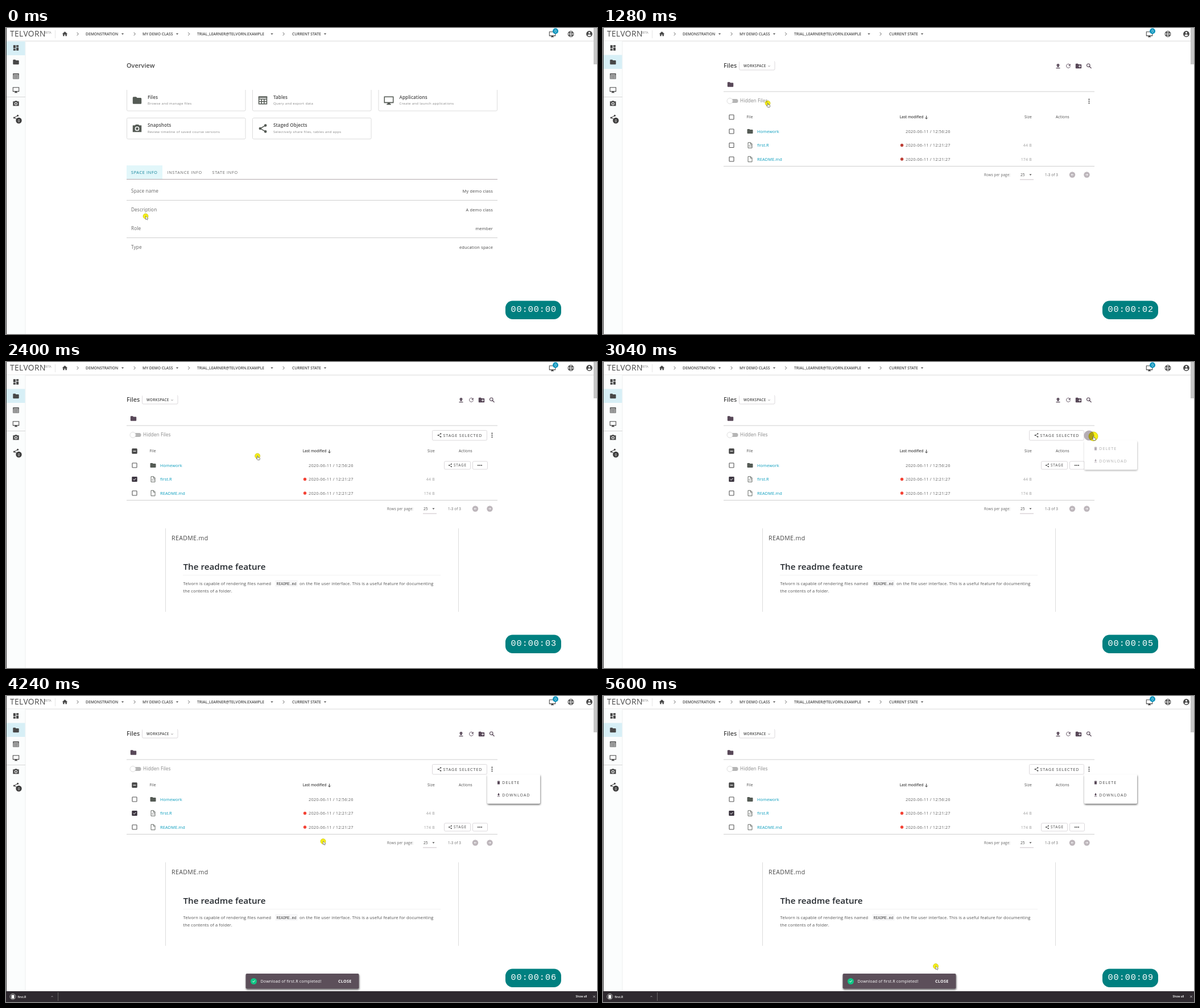
Animation of 1039 by 539 pixels, one loop 5.68 s. Source, as an HTML page:

```html
<!DOCTYPE html>
<html lang="en">
<head>
<meta charset="utf-8">
<title>File download walkthrough</title>
<style>
html, body { margin: 0; width: 100%; height: 100%; overflow: hidden; background: #fff; }
svg { display: block; width: 100%; height: 100%; }
text { font-family: "Open Sans", "Noto Sans", sans-serif; white-space: pre; }
text.mono { font-family: "Liberation Mono", "DejaVu Sans Mono", monospace; }
#dot { mix-blend-mode: multiply; }
</style>
</head>
<body>
<svg id="stage" viewBox="0 0 1039 539" xmlns="http://www.w3.org/2000/svg"></svg>
<script>
const LOOP = 5680, STEP = 80;
const INK = '#474747', SOFT = '#858585', LINK = '#0a9dbd', PLUM = '#584858', ICON = '#555b55';

const line = (d, w = 2) =>
  `<path d="${d}" fill="none" stroke="currentColor" stroke-width="${w}"/>`;
const solid = d => `<path d="${d}" fill-rule="evenodd"/>`;
const folder = 'M10 4H4a2 2 0 0 0-2 2v12a2 2 0 0 0 2 2h16a2 2 0 0 0 2-2V8a2 2 0 0 0-2-2h-8z';
const page = line('M5 2.5h9l5 5V21.5H5zM13.5 3v5.5h5.5', 1.8);

// Icons on a 24 unit grid
const ICONS = {
  dash: solid('M3 3h8v10H3zM13 3h8v6h-8zM3 15h8v6H3zM13 11h8v10h-8z'),
  folder: solid(folder),
  newFolder: solid(folder + 'M15 9h2v3h3v2h-3v3h-2v-3h-3v-2h3z'),
  table: line('M3 4h18v16H3zM3 9h18M3 14.5h18M9 9v11M15 9v11') + solid('M2 3h20v3H2z'),
  monitor: solid('M1 3h22v15h-8v2h2v2H7v-2h2v-2H1zM3 5v11h18V5z'),
  camera: solid('M9 3 7 5H2v15h20V5h-5l-2-2zM12 7.5a5 5 0 1 1 0 10 5 5 0 1 1 0-10zm0 2a3 3 0 1 0 0 6 3 3 0 1 0 0-6z'),
  share: line('M18 5 6 12l12 7') + [[18, 5], [6, 12], [18, 19]].map(([x, y]) => `<circle cx="${x}" cy="${y}" r="3"/>`).join(''),
  upload: solid('M5 18h14v2.5H5zM5 10h4v6h6v-6h4l-7-7z'),
  download: solid('M5 18h14v2.5H5zM19 9h-4V3H9v6H5l7 7z'),
  refresh: line('M17.5 6.5A7.5 7.5 0 1 0 19.5 13') + solid('M20 3v8h-8z'),
  search: line('M15 9.5a5.5 5.5 0 1 1-11 0 5.5 5.5 0 1 1 11 0zM14 14l6 6', 2.4),
  trash: solid('M6 7h12v14H6zM5 4h4l1-1h4l1 1h4v2H5z'),
  home: solid('M10 20v-6h4v6h5v-8h3L12 3 2 12h3v8z'),
  buoy: line('M21 12a9 9 0 1 1-18 0 9 9 0 1 1 18 0zM16 12a4 4 0 1 1-8 0 4 4 0 1 1 8 0z') +
    line('M6 6l3 3M18 6l-3 3M6 18l3-3M18 18l-3-3', 4),
  person: solid('M22 12a10 10 0 1 1-20 0 10 10 0 1 1 20 0zM12 5a3 3 0 1 0 0 6 3 3 0 1 0 0-6zM6 16q6-5 12 0-6 7-12 0z'),
  page,
  code: page + line('M11 11l-2.5 3 2.5 3M14 11l2.5 3-2.5 3', 1.6),
  check: line('M5 12l5 5 9-10', 3),
  cross: line('M5 5l14 14M19 5 5 19', 3),
  chevron: line('M8 4l8 8-8 8', 2.6),
  down: line('M5 9l7 7 7-7', 3),
  up: line('M5 15l7-7 7 7', 3),
  caret: solid('M4 8h16l-8 9z'),
  left: line('M19 12H6M12 6l-6 6 6 6', 2.5),
  right: line('M5 12h13M12 6l6 6-6 6', 2.5),
  sort: line('M12 3v17M5 13l7 7 7-7', 3)
};

const icon = (name, x, y, size, color = ICON) =>
  `<g transform="translate(${x - size / 2} ${y - size / 2}) scale(${size / 24})" fill="${color}" color="${color}">${ICONS[name]}</g>`;
const text = (x, y, size, str, { color = INK, weight = 400, gap = 0, anchor = 'start', cls = '', id = '' } = {}) =>
  `<text x="${x}" y="${y}" font-size="${size}" fill="${color}" font-weight="${weight}" letter-spacing="${gap}" text-anchor="${anchor}" class="${cls}" id="${id}">${str}</text>`;
const rect = (x, y, w, h, fill, extra = '') =>
  `<rect x="${x}" y="${y}" width="${w}" height="${h}" fill="${fill}" ${extra}/>`;
const circle = (x, y, r, fill, extra = '') =>
  `<circle cx="${x}" cy="${y}" r="${r}" fill="${fill}" ${extra}/>`;
const rule = (x1, x2, y, color = '#cfcfcf') => rect(x1, y, x2 - x1, 1, color);
const group = (id, body) => `<g id="${id}">${body}</g>`;
const button = (x, y, w, h) => rect(x + .5, y + .5, w - 1, h - 1, 'none', 'rx="2" stroke="#dcd9dc"');
const dots = (x, y, dx, dy, r) => [-1, 0, 1].map(i => circle(x + i * dx, y + i * dy, r, INK)).join('');

function header() {
  const crumbs = [[140, 'DEMONSTRATION', 205], [240, 'MY DEMO CLASS', 301],
    [336, 'TRIAL_LEARNER@TELVORN.EXAMPLE', 467.5], [503, 'CURRENT STATE', 561]];
  return text(7, 15, 13.8, 'TELVORN', { gap: .4 }) + text(68, 9.5, 5, 'BETA', { color: SOFT }) +
    rect(86, 4, 1, 14, '#e6e6e6') + icon('home', 103.5, 10.5, 11.5, INK) +
    [126, 226, 321.5, 488].map(x => icon('chevron', x, 10.5, 8, INK)).join('') +
    crumbs.map(([x, label, end]) => text(x, 13, 6.7, label, { weight: 600 }) + icon('caret', end, 10.5, 6.5, INK)).join('') +
    icon('monitor', 960.5, 11, 12.5, INK) + circle(966, 5.5, 5, '#0a94bd') +
    text(966, 8, 6.5, '0', { color: '#fff', anchor: 'middle' }) +
    icon('buoy', 993, 10.5, 13, INK) + icon('person', 1025.5, 10.5, 13, INK) +
    rule(0, 1033, 22.5, '#dadada') + rect(1033, 0, 6, 64, '#c6c6c6');
}

function sidebar() {
  const items = [['dash', 35], ['folder', 60], ['table', 85], ['monitor', 109], ['camera', 133], ['share', 158]];
  return rect(1, 23, 33, 516, '#fbfdfd') + rect(33.5, 23, 1, 516, '#eef0f0') +
    rect(1, 23.5, 32.5, 24.5, '#d7eff6', 'id="active"') +
    items.map(([name, y]) => icon(name, 17.5, y, 12.5, INK)).join('') +
    rule(1, 34, 121, '#d6d6d6') + circle(22.5, 163, 5.2, '#3d3d3d') +
    text(22.5, 165.5, 6.5, '0', { color: '#fff', anchor: 'middle' }) + rect(0, 0, 1, 539, '#333');
}

function overview() {
  const cards = [
    [212, 109, 'folder', 'Files', 'Browse and manage files'],
    [433, 109, 'table', 'Tables', 'Query and export data'],
    [654.5, 109, 'monitor', 'Applications', 'Create and launch applications'],
    [212, 158, 'camera', 'Snapshots', 'Review timeline of saved course versions'],
    [433, 158, 'share', 'Staged Objects', 'Selectively share files, tables and apps']];
  const facts = [['Space name', 'My demo class'], ['Description', 'A demo class'],
    ['Role', 'member'], ['Type', 'education space']];
  const card = ([x, y, glyph, title, note]) => {
    const open = y < 150, base = open ? 124.5 : 174;
    const outline = open ? `M${x + .5} ${y}v35q0 2 2 2h204.5q2 0 2-2v-35`
      : `M${x + 2.5} ${y + .5}h204.5q2 0 2 2v33q0 2-2 2h-204.5q-2 0-2-2v-33q0-2 2-2z`;
    return `<path d="${outline}" fill="none" stroke="#dcdcdc"/>` + icon(glyph, x + 18.5, base + 3, 18.5) +
      text(x + 37, base, 8, title, { weight: 600, gap: .15 }) +
      text(x + 37, base + 10.5, 6, note, { color: SOFT, gap: .33 });
  };
  return text(212, 70, 10.8, 'Overview', { weight: 600, gap: .1 }) + cards.map(card).join('') +
    rect(212, 242, 63, 24.5, '#e2f7fa') + text(220, 257, 7.2, 'SPACE INFO', { color: '#087f96', gap: .72 }) +
    text(283.5, 257, 7.2, 'INSTANCE INFO', { color: '#666', gap: .72 }) +
    text(362.5, 257, 7.2, 'STATE INFO', { color: '#666', gap: .72 }) + rule(212, 864, 266, '#b3a9ae') +
    facts.map(([k, v], i) => text(220, 290 + i * 33, 8.2, k, { color: '#666', gap: .15 }) +
      text(856, 290 + i * 33, 7.4, v, { gap: .2, anchor: 'end' })).join('') +
    rule(212, 864, 303) + rule(212, 864, 369);
}

const box = y => rect(222, y - 4, 8, 8, '#fff', 'stroke="#555" stroke-width="1.1" rx=".8"');
const rowTools = (id, y) => group(id, button(770, y - 7.5, 47, 15) + icon('share', 781, y, 8, INK) +
  text(787, y + 2.4, 6.3, 'STAGE', { gap: .9 }) + button(820, y - 7.5, 27, 15) + dots(833, y, 3, 0, 1.1));

function files() {
  const rows = [['folder', 'Homework', '2020-06-11 / 12:56:26', ''],
    ['code', 'first.R', '2020-06-11 / 12:21:27', '44 B'],
    ['page', 'README.md', '2020-06-11 / 12:21:27', '174 B']];
  const row = ([glyph, name, date, size], i) => {
    const y = 182 + i * 24.5;
    return box(y) + icon(glyph, 258.5, y, 12) + text(271, y + 2.7, 7.4, name, { color: LINK, gap: .1, weight: 500 }) +
      (i ? circle(525.5, y, 2.7, '#f44336', 'class="flag"') : '') +
      text(532, y + 2.7, 7.4, date, { color: '#666', gap: .2 }) +
      text(754, y + 2.7, 7, size, { color: '#a0a0a0', anchor: 'end', gap: .2 });
  };
  const head = { gap: .22 };
  return text(212, 70, 10.8, 'Files', { weight: 600 }) + button(239, 58, 63.5, 16.5) +
    rect(240, 57, 61, 3, '#fff') + text(247, 69, 6.2, 'WORKSPACE', { weight: 600, gap: .3 }) +
    icon('down', 292, 67, 5, INK) + icon('upload', 800, 67, 12, PLUM) + icon('refresh', 818, 67, 11, PLUM) +
    icon('newFolder', 836, 67, 12.5, PLUM) + icon('search', 854.5, 67, 12, PLUM) +
    icon('folder', 224, 99.5, 12.5, PLUM) + rule(212, 864, 111.5) +
    rect(221, 125, 16.5, 7, '#b5b5b5', 'rx="3.5"') + circle(223, 128.5, 5, '#fff', 'stroke="#ddd"') +
    text(241, 131, 8.2, 'Hidden Files', { color: SOFT, gap: .15 }) + dots(854.5, 129, 0, 3.3, 1.1) +
    group('hover', rect(212, 194, 652, 24.5, '#f1ecf1') + rule(212, 864, 194, '#e3dce2') +
      rule(212, 864, 218, '#e3dce2') + circle(226.5, 206.5, 10.5, '#c2bcc2')) +
    box(157) + text(252.5, 159.4, 6.5, 'File', head) +
    text(521.5, 159.4, 6.4, 'Last modified', { weight: 600 }) + icon('sort', 568.5, 157.5, 8, INK) +
    text(741, 159.4, 6.5, 'Size', head) + text(796, 159.4, 6.5, 'Actions', head) +
    rows.map(row).join('') + rule(212, 864, 243) +
    group('checks', rect(221.5, 152.5, 9, 9, '#484848', 'rx="1"') + rect(223.5, 156.5, 5, 1.2, '#fff') +
      rect(221.5, 202, 9, 9, '#3c3540', 'rx="1"') + icon('check', 226, 206.5, 8, '#fff') +
      button(749, 120, 97, 18.5) + icon('share', 762, 129, 9, INK) +
      text(768.5, 131.7, 7.2, 'STAGE SELECTED', { gap: .9 })) +
    rowTools('homeTools', 182) + rowTools('firstTools', 206.5) + rowTools('readTools', 231) +
    text(670, 260.5, 6.2, 'Rows per page:', { color: '#666', gap: .15 }) + text(734, 260.7, 6.5, '25') +
    icon('caret', 751.5, 258.5, 6, INK) + rule(733, 757, 266.5, '#c9bfc6') +
    text(777, 260.5, 6.2, '1-3 of 3', { color: '#666', gap: .15 }) +
    ['left', 'right'].map((name, i) => circle(825 + i * 25.5, 258.5, 5.2, '#bdb6bb') +
      icon(name, 825 + i * 25.5, 258.5, 7.5, '#fff')).join('');
}

function readme() {
  const body = { color: '#505050', gap: .16 };
  return rect(280, 293, 1, 147, '#dcdcdc') + rect(795, 293, 1, 147, '#dcdcdc') +
    text(291, 314, 10.5, 'README.md', { gap: .4 }) + text(311.5, 366, 15.2, 'The readme feature', { weight: 600, color: '#24292e' }) +
    rule(311, 764, 375, '#f2f2f2') + text(311.5, 392.5, 7.4, 'Telvorn is capable of rendering files named', body) +
    rect(473, 384, 40, 12, '#f7f7f8', 'rx="2"') + text(475.5, 392.5, 6.5, 'README.md', { cls: 'mono' }) +
    text(516, 392.5, 7.4, 'on the file user interface. This is a useful feature for documenting', body) +
    text(311.5, 406, 7.4, 'the contents of a folder.', body);
}

function menu() {
  const label = { gap: 1.1 };
  return group('menuPanel', rect(846, 138, 93, 51.5, '#fff', 'rx="2" filter="url(#shade)"')) +
    rect(854, 165.5, 76, 18, '#f2f0f2', 'rx="2" id="menuHover"') +
    group('menuText', icon('trash', 866, 152.5, 8, PLUM) + text(872.3, 155, 7, 'DELETE', label) +
      icon('download', 866, 174.5, 8, PLUM) + text(872.3, 177.3, 7, 'DOWNLOAD', label));
}

const snackbar = () => rect(421.5, 489, 199, 26.5, '#5b505a', 'rx="2" filter="url(#shade)"') +
  circle(435.5, 502.5, 5.5, '#10c685') + icon('check', 435.5, 502.5, 7.5, '#fff') +
  text(447.5, 505, 7.1, 'Download of first.R completed!', { color: '#fff', gap: .16 }) +
  text(584, 505, 7.1, 'CLOSE', { color: '#fff', weight: 700, gap: .3 });

const shelf = () => rect(0, 520, 1039, 24, '#2f2a30') + circle(12, 529.5, 5, 'none', 'stroke="#aaa"') +
  rect(9.5, 526.5, 5, 6.5, '#fff', 'rx=".5"') +
  group('item', text(20.5, 531.5, 5.2, 'first.R', { color: '#fff', weight: 600 })) +
  group('itemEnd', icon('up', -10, 529.5, 5, '#ddd') + rect(0, 522, 1, 15, '#666')) +
  text(1001.5, 531.3, 5, 'Show all', { color: '#fff', weight: 600 }) + icon('cross', 1034, 529.5, 6, '#ddd');

const pointer = () => circle(0, 0, 4.5, '#f6f018', 'id="dot" stroke="#c3bc10" stroke-width=".7"') +
  '<path id="hand" d="M-.5 0q1-.8 1.6.3v2.2l2.6.9q.9.4.6 1.5l-.7 2.1h-3.5l-2-2.5q.3-1 1.4-.1z" fill="#fff" stroke="#444" stroke-width=".7"/>' +
  '<path id="arrow" d="M0-.5v6.5l1.5-1.3 1 2 1-.5-.9-2h2z" fill="#fff" stroke="#555" stroke-width=".6"/>';

document.getElementById('stage').innerHTML =
  '<defs><filter id="shade" x="-20%" y="-30%" width="140%" height="170%"><feDropShadow dx=".5" dy="2" stdDeviation="1.8" flood-opacity=".6"/></filter></defs>' +
  rect(0, 0, 1039, 539, '#fff') + header() + sidebar() + group('overview', overview()) +
  group('files', files()) + group('readme', readme()) +
  circle(854.5, 129.5, 9, '#b5adb3', 'id="ripple"') + group('menu', menu()) +
  group('snackbar', snackbar()) +
  group('arrival', icon('download', 0, 0, 17, '#8fb8f5')) + group('shelf', shelf()) +
  rect(878, 480.5, 98, 32.5, '#008080', 'rx="12.5"') +
  text(887.5, 500.3, 15.2, '00:00:00', { color: '#fff', cls: 'mono', gap: .95, id: 'clock' }) + group('cursor', pointer());

const el = id => document.getElementById(id);
const flags = document.querySelectorAll('.flag');
const show = (id, on) => { el(id).style.display = on ? '' : 'none'; };
const move = (id, x, y) => el(id).setAttribute('transform', `translate(${x} ${y})`);
const between = (t, a, b) => t >= a && t < b;
const progress = (t, a, b) => Math.min(1, Math.max(0, (t - a) / (b - a)));
const easeOut = p => 1 - (1 - p) ** 2;

// Cursor stops: time, x, y
const PATH = [[0, 245.5, 331.5], [400, 245.5, 331.5], [880, 20, 62], [1040, 17, 60], [1280, 289.5, 132.5],
  [1680, 289.5, 132.5], [1920, 226, 206], [2240, 226, 206], [2640, 840, 91], [2800, 860, 128],
  [2880, 862, 131], [3120, 862, 131], [3440, 897, 175.5], [4080, 897, 175.5], [4160, 760, 198],
  [4240, 557.5, 256], [4720, 550, 387], [5360, 585, 476], [LOOP, 585, 476]];
const CLICKS = [960, 2240, 3040, 3520];

function cursorAt(t) {
  const i = PATH.findIndex(p => p[0] > t);
  const [t0, x0, y0] = PATH[i - 1], [t1, x1, y1] = PATH[i];
  const p = progress(t, t0, t1), k = p * p * (3 - 2 * p);
  return [x0 + (x1 - x0) * k, y0 + (y1 - y0) * k];
}

function draw(t) {
  const onFiles = t >= 1040;
  show('overview', !onFiles);
  show('files', onFiles);
  el('active').setAttribute('y', onFiles ? 47.5 : 23.5);
  flags.forEach(f => f.setAttribute('fill', t < 1440 ? '#bd4138' : '#f44336'));
  show('readme', t >= 1440);

  show('hover', between(t, 1920, 2400));
  show('firstTools', between(t, 1920, 2400));
  show('homeTools', between(t, 2400, 4160));
  show('readTools', t >= 4240);
  show('checks', t >= 2240);

  show('ripple', between(t, 2880, 3120));
  show('menu', t >= 3040);
  const opened = progress(t, 2960, 3200);
  el('menuPanel').style.opacity = .2 + .8 * opened;
  el('menuText').style.opacity = .15 + .85 * opened;
  show('menuHover', between(t, 3360, 4160));

  show('snackbar', t >= 3760);
  move('snackbar', 0, 40 * (1 - easeOut(progress(t, 3680, 4160))));
  show('shelf', t >= 3680);
  move('shelf', 0, 20 * (1 - easeOut(progress(t, 3600, 4040))));
  show('arrival', between(t, 3680, 4000));
  move('arrival', 15.5, 487 + 12 * progress(t, 3680, 3920));
  el('arrival').style.opacity = 1 - progress(t, 3760, 4080);
  show('item', t >= 4000);
  show('itemEnd', t >= 4000);
  move('itemEnd', 95 - 60 * (1 - easeOut(progress(t, 3920, 4350))), 0);

  const [x, y] = cursorAt(t);
  move('cursor', x.toFixed(2), y.toFixed(2));
  el('dot').setAttribute('r', CLICKS.some(c => between(t, c, c + 2 * STEP)) ? 8 : 4.5);
  const clickable = between(t, 880, 4160);
  show('hand', clickable);
  show('arrow', !clickable);
  el('clock').textContent = '00:00:0' + Math.floor((t + 60) / 620);
}

const start = performance.now();
function tick() {
  const t = (performance.now() - start) % LOOP;
  draw(Math.floor(t / STEP) * STEP);
  requestAnimationFrame(tick);
}
tick();
</script>
</body>
</html>
```
